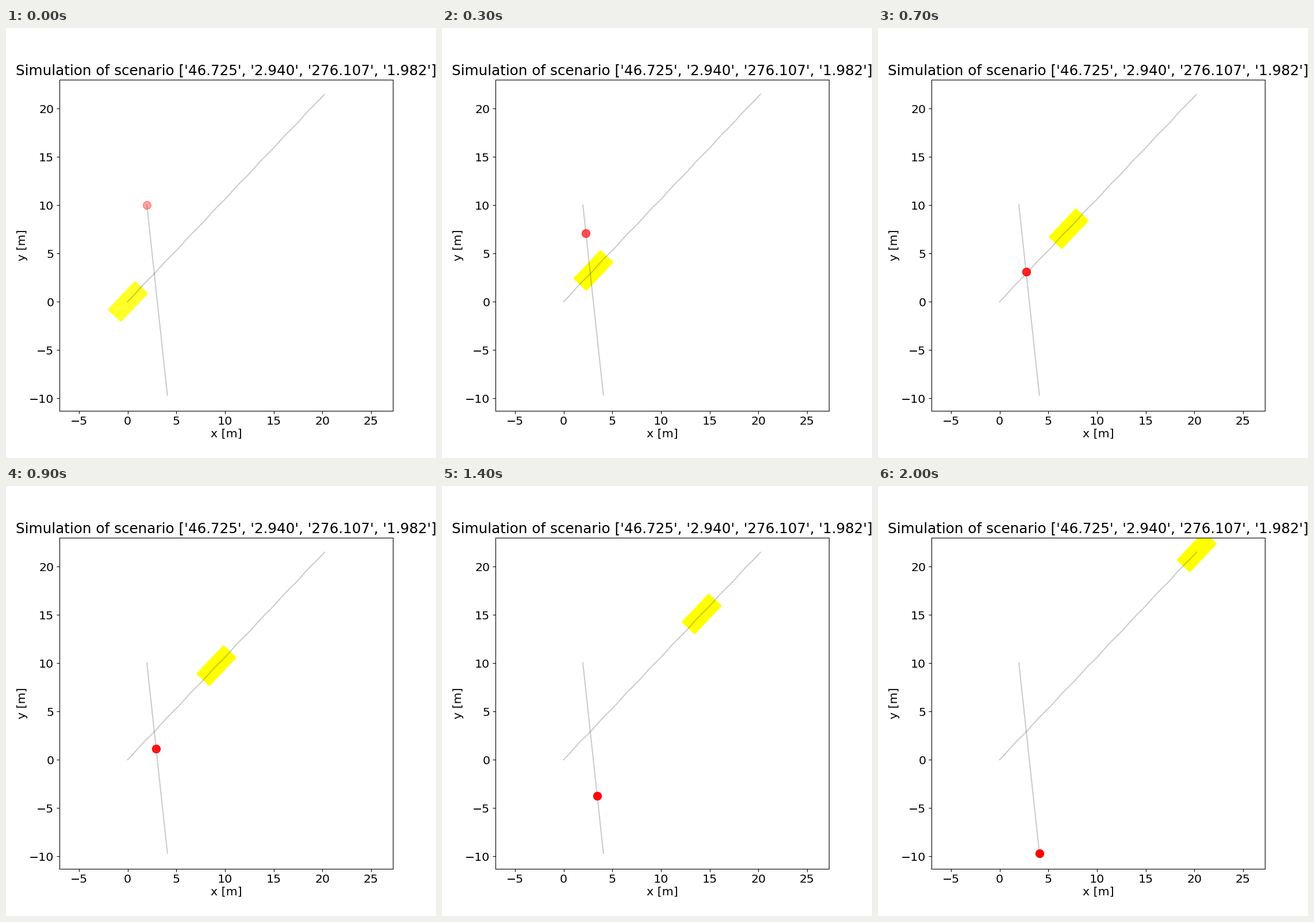
A matplotlib script for the animation above (2.1 s loop, 748 px wide and 748 px high).

```python
import numpy as np
import matplotlib.pyplot as plt
from matplotlib.animation import FuncAnimation
from matplotlib.patches import Rectangle

FRAMES, INTERVAL = 21, 100
STAGE, DPI = 748, 100
CAR_ANGLE, CAR_STEP = 46.725, 1.011
CAR_L, CAR_W = 4.0, 1.8
WALK_ANGLE, WALK_STEP = np.radians(276.107), 1.982 * 0.5
TRACK = dict(color="black", alpha=0.2, lw=1.5)

plt.rcParams.update({"font.family": "DejaVu Sans", "font.size": 14.75})


def track_y(x):
    """Straight slope with a slight steering wobble."""
    return np.tan(np.radians(CAR_ANGLE)) * x + 0.02 + 0.04 * np.sin(2 * np.pi * (x - 1) / 2.42)


def car_pos(i):
    x = CAR_STEP * i + 0.03
    return x, track_y(x)


def walker_pos(i):
    d = WALK_STEP * i
    return 1.98 + d * np.cos(WALK_ANGLE), 10.03 + d * np.sin(WALK_ANGLE)


def stacked(alpha, i):
    """Opacity of i + 2 equal layers on top of each other."""
    return 1 - (1 - alpha) ** (i + 2)


fig, ax = plt.subplots(figsize=(STAGE / DPI, STAGE / DPI), dpi=DPI)
fig.subplots_adjust(left=0.1243, right=0.8995, bottom=0.11, top=0.88)
ax.set_xlim(-7, 27.24)
ax.set_ylim(-11.28, 23)
ax.set_xticks(range(-5, 26, 5))
ax.set_yticks(range(-10, 21, 5))
ax.set_xlabel("x [m]", labelpad=1.3)
ax.set_ylabel("y [m]", labelpad=1)
ax.set_title("Simulation of scenario ['46.725', '2.940', '276.107', '1.982']",
             fontsize=17.7)

xs = np.linspace(0, CAR_STEP * (FRAMES - 1), 2 * FRAMES - 1)
ax.plot(xs, track_y(xs), **TRACK)
ax.plot(*zip(walker_pos(0), walker_pos(FRAMES - 1)), **TRACK)
car = ax.add_patch(Rectangle((0, 0), CAR_L, CAR_W, angle=CAR_ANGLE,
                             rotation_point="center", color="yellow", lw=1))
walker, = ax.plot([], [], "o", color="red", ms=10)


def update(i):
    x, y = car_pos(i)
    car.set_xy((x - CAR_L / 2, y - CAR_W / 2))
    car.set_alpha(stacked(0.6, i))
    px, py = walker_pos(i)
    walker.set_data([px], [py])
    walker.set_alpha(stacked(0.2, i))
    return car, walker


anim = FuncAnimation(fig, update, frames=FRAMES, interval=INTERVAL,
                     repeat=True, repeat_delay=0)
plt.show()
```
